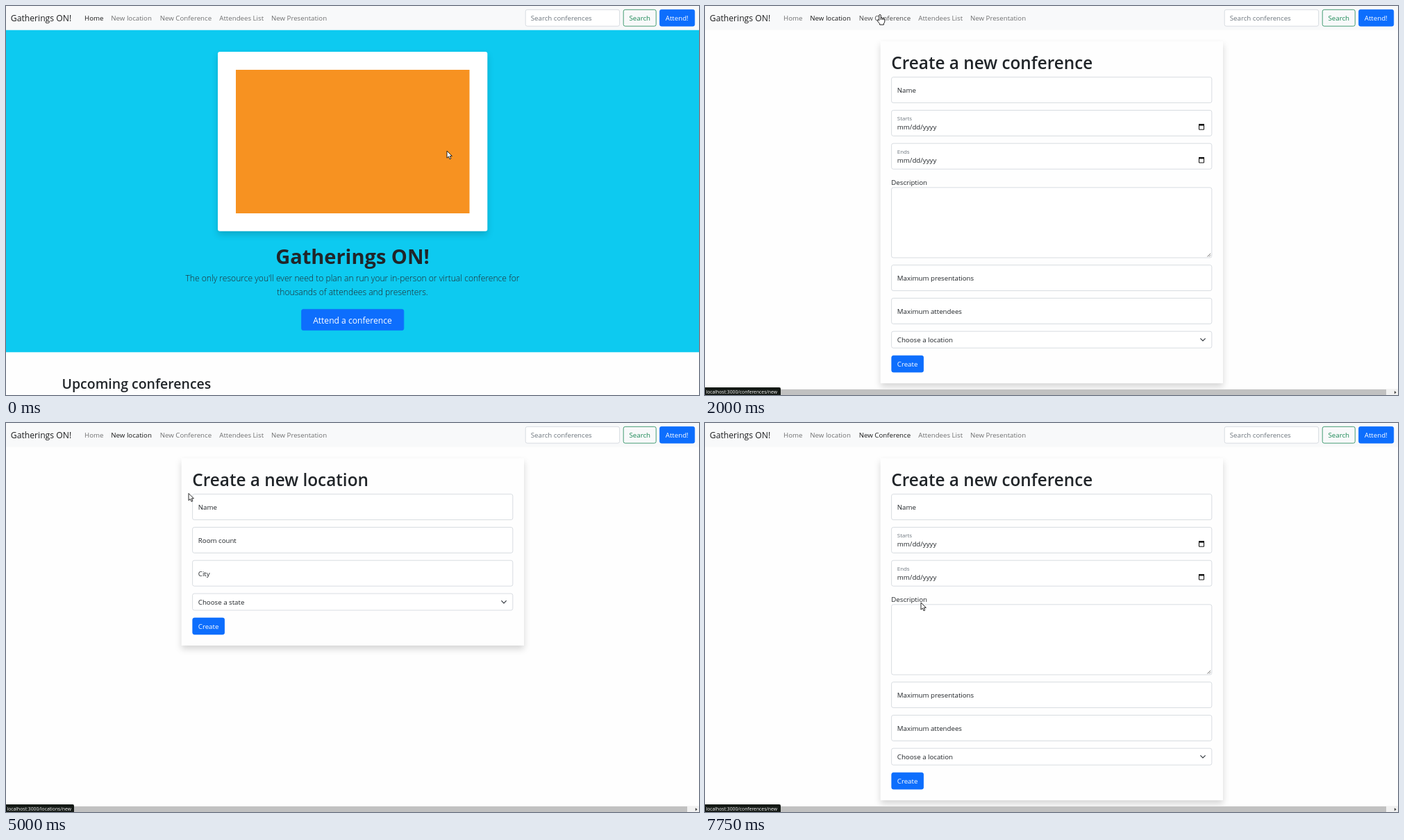
These frames come from a looping animation (998x561 px, 8 s). An HTML page:

```html
<!DOCTYPE html>
<html lang="en">
<head>
<meta charset="utf-8">
<title>Gatherings ON!</title>
<style>
  html, body { margin: 0; width: 100%; height: 100%; overflow: hidden; background: #fefefe; }
  svg { position: absolute; left: 0; top: 0; width: 998px; height: 561px; }
  svg, #status { font-family: "Open Sans", "Noto Sans", sans-serif; }
  text { white-space: pre; }
  .shadow { filter: drop-shadow(0 5px 5px rgba(0, 0, 0, .16)); }
  #status {
    position: absolute; left: 0; top: 549.5px; height: 12px; padding: 0 4.5px 0 1.5px;
    background: #151a16; color: #fff; font-size: 6.8px; line-height: 13px;
    border-top-right-radius: 2px; white-space: nowrap;
  }
  #top { pointer-events: none; }
</style>
</head>
<body>
<svg id="stage" viewBox="0 0 998 561"></svg>
<div id="status"></div>
<svg id="top" viewBox="0 0 998 561">
  <path id="arrow" d="M0 0V10.2L2.4 8L4 11.8L5.8 11L4.2 7.4H7.4Z" fill="#fff" stroke="#111" stroke-width=".9"/>
  <path id="hand" d="M-1.3 1.2Q0-.6 1.3 1.2V5.2Q2.6 4.3 3.5 5.6Q4.8 4.9 5.4 6.2Q6.8 5.8 6.8 7.6V10.2Q6.8 12 5.4 13.2V15H-.4V13.6Q-2.4 11.6-3.9 8.8Q-3.6 7.2-2.2 8L-1.3 9Z
    M1.3 5V8M3.5 5.6V8M5.4 6.2V8" fill="#fff" stroke="#111" stroke-width=".95" stroke-linejoin="round"/>
</svg>
<script>
const BODY = 9.7, INK = '#212529', GREY = '#6c757d', BLUE = '#0d6efd', LINE = '#ced4da';
const BRAND = 'Gatherings ON!';
const $ = id => document.getElementById(id);

const text = (x, y, str, size = BODY, fill = INK, extra = '') =>
  `<text x="${x}" y="${y}" font-size="${size}" fill="${fill}" ${extra}>${str}</text>`;
const centred = (y, str, size, fill, extra = '') =>
  text(499, y, str, size, fill, `text-anchor="middle" ${extra}`);
const rect = (x, y, w, h, fill, extra = '') =>
  `<rect x="${x}" y="${y}" width="${w}" height="${h}" fill="${fill}" ${extra}/>`;
const box = (x, y, w, h, fill = '#fff', stroke = LINE) =>
  rect(x, y, w, h, fill, `rx="2.6" stroke="${stroke}" stroke-width=".8"`);
const stroke = (d, colour = '#343a40', width = 1.2) =>
  `<path d="${d}" fill="none" stroke="${colour}" stroke-width="${width}"/>`;
const triangle = (d, fill) => `<path d="${d}z" fill="${fill}"/>`;
const group = (id, content) => `<g id="${id}">${content}</g>`;

// Navigation: label, left edge, right edge, path
const links = [
  ['Home', 113, 141, ''],
  ['New location', 151.3, 211, 'locations/new'],
  ['New Conference', 221.7, 297, 'conferences/new'],
  ['Attendees List', 307.3, 371.5, 'attendees'],
  ['New Presentation', 382, 462.5, 'presentations/new'],
];

const NAV = 34.5;
const navbar = rect(0, 0, 998, NAV, '#f8f9fa')
  + text(6.8, 21.7, BRAND, 12.2, '#1c1d1e')
  + links.map(([label, x], i) => text(x, 20.8, label, BODY, '#000', `id="link${i}"`)).join('')
  + box(748.2, 5.3, 135.4, 23.8) + text(755.8, 20.8, 'Search conferences', BODY, GREY)
  + box(889.2, 5.3, 47, 23.8, 'none', '#198754') + text(897.5, 20.8, 'Search', BODY, '#198754')
  + box(941.5, 5.3, 50.2, 23.8, BLUE, BLUE) + text(949.8, 20.8, 'Attend!', BODY, '#fff');

const home = rect(0, NAV, 998, 499.3 - NAV, '#0dcaf0')
  + rect(305, 66, 388.3, 258.7, '#fff', 'rx="3" class="shadow"')
  + rect(331, 92, 336.5, 207, '#f79221')
  + centred(371.6, BRAND, 29, INK, 'font-weight="700"')
  + centred(397.3, "The only resource you'll ever need to plan an run your in-person or virtual conference for", 12.1, INK, 'font-weight="300"')
  + centred(416.8, 'thousands of attendees and presenters.', 12.1, INK, 'font-weight="300"')
  + box(425.6, 437.4, 147.2, 30.2, BLUE, BLUE)
  + centred(458, 'Attend a conference', 12.1, '#fff')
  + text(80.5, 551.5, 'Upcoming conferences', 19.5, INK, 'font-weight="600"');

const attendees = text(4, 51.8, 'Name', 9.6, INK, 'font-weight="700"')
  + text(378.8, 51.8, 'Conference', 9.6, INK, 'font-weight="700"')
  + rect(0, 61, 998, 1, '#dee2e6');

// Each field kind returns its markup and its height
const LEFT = 268.6, WIDTH = 461.2, INSET = 276.8;
const frame = (y, h) => box(LEFT, y, WIDTH, h);
const grip = y => stroke(`M723.5 ${y - 1.5}l4.6-4.6M726 ${y - 1.5}l2.1-2.1`, '#555', .8);
const kinds = {
  input: (y, label) => [frame(y, 37) + text(INSET, y + 22.7, label), 37.4],
  date: (y, label) => [frame(y, 37) + text(INSET, y + 14.3, label, 7.9, GREY)
    + text(INSET, y + 28, 'mm/dd/yyyy')
    + `<path d="M711.5 ${y + 20.2}h7v7.6h-7z" fill="none" stroke="#111"/>`
    + rect(711, y + 19.8, 8, 2.4, '#111'), 37.4],
  area: (y, hint) => [frame(y, 55) + text(INSET, y + 16.4, hint, BODY, GREY) + grip(y + 55), 55.4],
  tall: (y, label) => [text(LEFT - .3, y + 11.6, label) + frame(y + 15.8, 101.2) + grip(y + 117), 117.2],
  select: (y, label) => [frame(y, 24) + text(INSET, y + 15.7, label)
    + stroke(`M713.4 ${y + 10.2}l3.6 3.6l3.6-3.6`), 24.5],
};

function form(title, fields) {
  let y = 102.6, out = '';
  for (const [kind, label] of fields) {
    const [markup, h] = kinds[kind](y, label);
    out += markup;
    y += h + 10.4;
  }
  out += box(LEFT + .2, y + .2, 45.8, 23.8, BLUE, BLUE) + text(INSET, y + 15.7, 'Create', BODY, '#fff');
  return rect(252.7, 51, 493.3, y - 11, '#fefefe', 'class="shadow"')
    + text(268.3, 91.2, title, 24.35, INK, 'font-weight="600"') + out;
}

const forms = {
  location: form('Create a new location', [
    ['input', 'Name'], ['input', 'Room count'], ['input', 'City'], ['select', 'Choose a state']]),
  conference: form('Create a new conference', [
    ['input', 'Name'], ['date', 'Starts'], ['date', 'Ends'], ['tall', 'Description'],
    ['input', 'Maximum presentations'], ['input', 'Maximum attendees'], ['select', 'Choose a location']]),
  presentation: form('Create a new presentation', [
    ['input', 'Presenter name'], ['input', 'Presenter email'], ['input', 'Company name'],
    ['input', 'Title'], ['area', 'Synopsis'], ['select', 'Choose a conference']]),
};

const scrollbar = rect(0, 552.3, 998, 8.7, '#f1f1f1') + rect(10, 553, 971, 8, '#c1c1c1')
  + triangle('M5.5 555v4.6l-2.8-2.3', '#a3a3a3') + triangle('M992.8 555v4.6l2.8-2.3', '#444');

const ring = `<rect x="267.3" y="244.7" width="463.8" height="26.6" rx="4" fill="none" stroke="#c2dbfe" stroke-width="2.6"/>`
  + `<rect x="${LEFT}" y="246" width="${WIDTH}" height="24" rx="2.6" fill="none" stroke="#86b7fe" stroke-width=".8"/>`;

const states = ('Choose a state,Alabama,Alaska,American Samoa,Arizona,Arkansas,California,Colorado,Connecticut,'
  + 'Delaware,District of Columbia,Florida,Georgia,Guam,Hawaii,Idaho,Illinois,Indiana,Iowa,Kansas').split(',');
const menu = rect(269.5, 271, 460, 281, '#fff', 'stroke="#767676" stroke-width=".8" class="shadow"')
  + rect(270, 271.2, 449.5, 14, '#1e90ff')
  + states.map((name, i) => text(277.6, 282.2 + i * 14.05, name, BODY, i ? INK : '#fff')).join('')
  + rect(719.5, 271.4, 9.6, 280.2, '#f1f1f1') + rect(720.3, 282, 8, 89, '#c1c1c1')
  + triangle('M722 278.5h4.8l-2.4-2.8', '#a3a3a3') + triangle('M722 544.8h4.8l-2.4 2.8', '#444');

const pages = { home, attendees, ...forms };
$('stage').innerHTML = Object.entries(pages).map(([id, markup]) => group(id, markup)).join('')
  + group('scrollbar', scrollbar) + group('ring', ring) + group('menu', menu) + navbar;

// Page shown and active link from a given time on
const views = [
  [0, 'home', 0], [1000, 'location', 0], [1250, 'location', 1], [2000, 'conference', 1],
  [2250, 'conference', 2], [2750, 'attendees', 2], [3000, 'attendees', 3],
  [3500, 'presentation', 3], [3750, 'presentation', 4], [5000, 'location', 1], [7500, 'conference', 2],
];

// Pointer waypoints: time, x, y
const route = [
  [0, 635, 209], [1000, 165, 9.7], [1250, 165, 9.7], [1750, 252, 12], [2000, 252, 12],
  [2500, 347, 15], [3000, 347, 15], [3250, 418, 19.5], [3500, 418, 19.5], [3750, 345, 14],
  [4500, 185, 12], [4750, 185, 12], [5000, 263, 101.5], [5750, 391, 262], [6500, 391, 262],
  [7000, 284, 5], [7250, 262, 10], [7500, 262, 10], [7750, 311, 259],
];
const LOOP = 8000, STEP = 250;

function pointer(t) {
  const i = route.findIndex(p => p[0] > t);
  if (i < 0) return route[route.length - 1].slice(1);
  if (i === 0) return route[0].slice(1);
  const [t0, x0, y0] = route[i - 1], [t1, x1, y1] = route[i];
  const k = (t - t0) / (t1 - t0);
  return [x0 + (x1 - x0) * k, y0 + (y1 - y0) * k];
}

function linkAt(t) {
  const [x, y] = pointer(t);
  return y > 30 ? -1 : links.findIndex(([, a, b]) => x >= a - 5 && x <= b + 5);
}

const show = (id, on) => { $(id).style.display = on ? '' : 'none'; };

function draw(t) {
  const [, page, active] = views.filter(v => v[0] <= t).pop();
  for (const id in pages) show(id, id === page);
  show('scrollbar', page in forms);
  show('ring', t >= 6000 && t < 7500);
  show('menu', t >= 6000 && t < 6750);

  const hover = linkAt(t), before = linkAt(t - STEP);
  links.forEach((_, i) => {
    const lit = i === hover && i === before;
    $('link' + i).setAttribute('fill-opacity', i === active ? .9 : lit ? .7 : .55);
  });

  // The address lingers for one step after the pointer leaves
  const link = hover < 0 ? before : hover;
  show('status', link >= 0);
  if (link >= 0) $('status').textContent = 'localhost:3000/' + links[link][3];
  $('status').style.opacity = before < 0 ? .75 : 1;

  const [x, y] = pointer(t);
  for (const id of ['arrow', 'hand']) {
    show(id, (id === 'hand') === (hover >= 0));
    $(id).setAttribute('transform', `translate(${x} ${y})`);
  }
}

function tick() {
  draw(Math.floor(performance.now() % LOOP / STEP) * STEP);
  requestAnimationFrame(tick);
}
tick();
</script>
</body>
</html>
```
